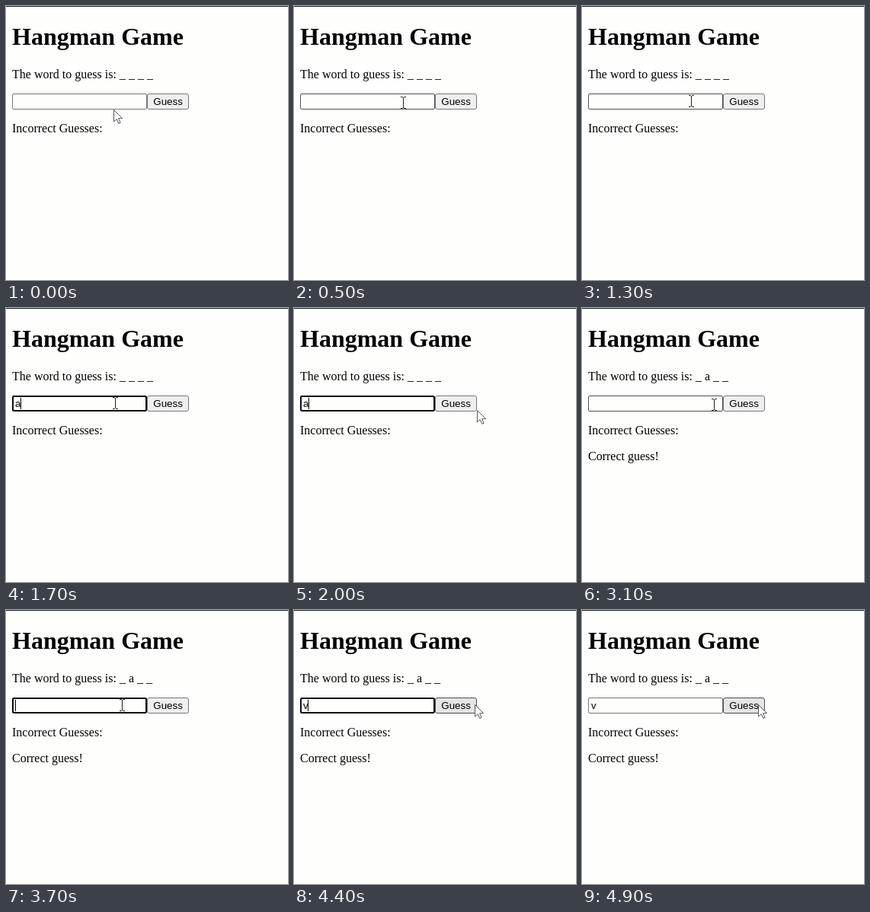
Animation of 370 by 360 pixels, one loop 5 s. Source, as an HTML page:

```html
<!DOCTYPE html>
<html lang="en">
<head>
<meta charset="utf-8">
<title>Hangman Game</title>
<style>
  html, body { margin: 0; width: 100%; height: 100%; overflow: hidden; background: #fefffd; }
  svg { display: block; width: 370px; height: 360px; }
  text { font: 16px "Liberation Serif", "Times New Roman", serif; fill: #000; white-space: pre; }
  .title { font-size: 32px; font-weight: bold; }
  .ui { font: 13.333px "Liberation Sans", Arial, sans-serif; }
  .box { stroke: #767676; }
  .box.hover { stroke: #4f4f4f; }
  #input, #ring { fill: #fefffd; }
  #button { fill: #efefef; }
  #button.hover { fill: #e5e5e5; }
</style>
</head>
<body>
<svg viewBox="0 0 370 360">
  <rect width="370" height="1" fill="#1c1e24"/>
  <text class="title" x="8" y="51">Hangman Game</text>
  <text id="word" x="8" y="95"></text>
  <rect id="input" class="box" x="8.5" y="115.5" width="176" height="20" rx="1.5"/>
  <rect id="ring" x="9" y="116" width="175" height="19" rx="2" stroke="#101010" stroke-width="2"/>
  <text id="entry" class="ui" x="12" y="130"></text>
  <rect id="caret" y="118" width="1" height="15"/>
  <rect id="button" class="box" x="185.5" y="115.5" width="54" height="20" rx="2.5"/>
  <text class="ui" x="193.3" y="130">Guess</text>
  <text x="8" y="166">Incorrect Guesses:</text>
  <text id="message" x="8" y="200">Correct guess!</text>
  <path id="arrow" d="M.5 .5V16L4.2 12.6L6.8 18.3L9.1 17.3L6.6 11.7H11.6Z" fill="#fff" stroke="#555" stroke-linejoin="round"/>
  <path id="beam" d="M-3 -7.5H-1L.5 -6.5L2 -7.5H4M.5 -6.5V6.5M-3 7.5H-1L.5 6.5L2 7.5H4" fill="none" stroke="#222"/>
</svg>
<script>
const LOOP = 5000, TICK = 100, BLINK = 500;

// Pointer path: time, x, y
const path = [
  [0, 141, 136], [100, 141, 136], [600, 143, 125], [1700, 143, 125],
  [1900, 236, 133], [2000, 240, 134], [2200, 227, 132], [2400, 224, 135.6],
  [2600, 224, 135.6], [2900, 216, 132], [3200, 152, 125], [4000, 152, 125],
  [4300, 234, 124], [4400, 237, 124], [4500, 237, 124], [4700, 231, 124], [LOOP, 231, 124]
];

// Form states: time, focused, typed text, word, message shown
const states = [
  [0, false, "", "_ _ _ _", false],
  [1400, true, "", "_ _ _ _", false],
  [1700, true, "a", "_ _ _ _", false],
  [2300, false, "a", "_ _ _ _", false],
  [2400, false, "", "_ a _ _", true],
  [3400, true, "", "_ a _ _", true],
  [4100, true, "v", "_ a _ _", true],
  [4800, false, "v", "_ a _ _", true]
];

const caretX = { "": 12, a: 19, v: 18 };
const $ = id => document.getElementById(id);
const [word, input, ring, entry, caret, button, message, arrow, beam] =
  ["word", "input", "ring", "entry", "caret", "button", "message", "arrow", "beam"].map($);
const show = (el, on) => el.setAttribute("visibility", on ? "visible" : "hidden");

function pointerAt(t) {
  const i = path.findIndex(p => p[0] > t);
  const [t0, x0, y0] = path[i - 1], [t1, x1, y1] = path[i];
  const k = (t - t0) / (t1 - t0);
  return [x0 + (x1 - x0) * k, y0 + (y1 - y0) * k];
}

function draw(t) {
  const [since, focused, typed, letters, correct] = states.filter(s => s[0] <= t).pop();
  word.textContent = "The word to guess is: " + letters;
  entry.textContent = typed;
  show(message, correct);
  show(ring, focused);
  show(caret, focused && (t - since) % (2 * BLINK) < BLINK);
  caret.setAttribute("x", caretX[typed]);

  const [x, y] = pointerAt(t);
  const inRow = y >= 115 && y < 136;
  const overInput = inRow && x < 185;
  const overButton = inRow && x >= 185 && x < 240;
  input.classList.toggle("hover", overInput);
  button.classList.toggle("hover", overButton);
  show(arrow, !overInput);
  show(beam, overInput);
  const pointer = overInput ? beam : arrow;
  pointer.setAttribute("transform", `translate(${Math.round(x)} ${Math.round(y)})`);
}

const start = performance.now();
function frame() {
  const t = (performance.now() - start) % LOOP;
  draw(Math.floor(t / TICK) * TICK);
  requestAnimationFrame(frame);
}
frame();
</script>
</body>
</html>
```
